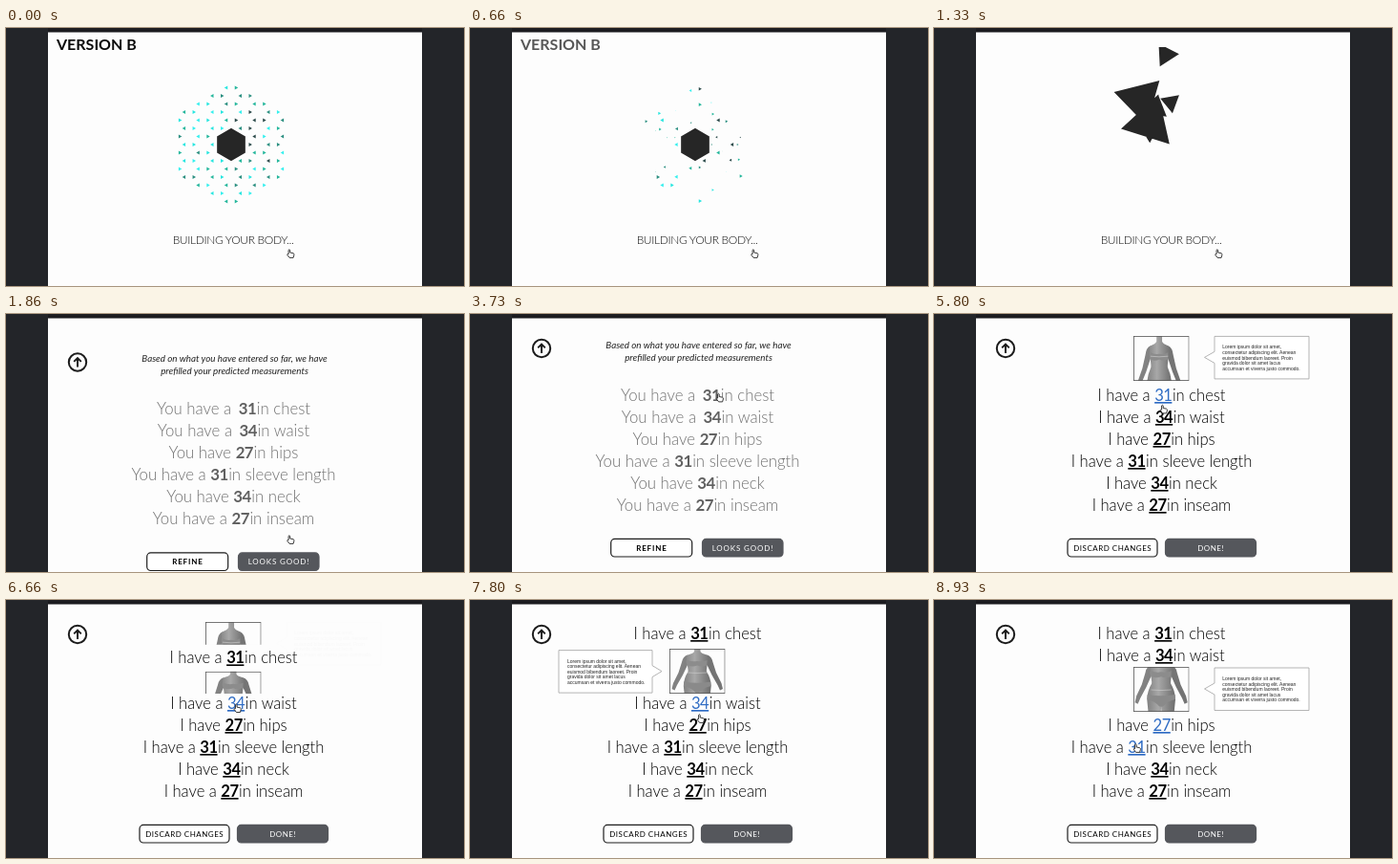
An HTML page for the animation above (9000 ms loop, 480x270 px).

```html
<!DOCTYPE html>
<html lang="en">
<head>
<meta charset="utf-8">
<title>Measurements</title>
<style>
  html, body { margin: 0; width: 100%; height: 100%; overflow: hidden; background: #232529; }
  svg { display: block; }
  #stage { width: 100vw; height: 100vh; }
  text { font-family: Lato, "Open Sans", sans-serif; white-space: pre; }
  .mid { text-anchor: middle; }
  .num { letter-spacing: -.5px; }
  .view { font-size: 16.8px; font-weight: 300; fill: #707070; }
  .view .num { font-weight: 700; fill: #606060; }
  .edit { font-size: 16.6px; font-weight: 300; fill: #000; }
  .edit .num { font-weight: 700; fill: #000; text-decoration: underline; }
  .edit .num.on { font-weight: 400; fill: #2f6cc4; }
  .btn { font-size: 8px; letter-spacing: .5px; }
  #viewPage .btn { letter-spacing: .85px; }
  .intro { font-size: 9.8px; font-style: italic; fill: #222; }
  .note text { font: 5px "Liberation Sans", Arial, sans-serif; fill: #222; }
  .note path { fill: #fff; stroke: #a2a2a2; stroke-width: .8; }
</style>
</head>
<body>
<svg id="stage" viewBox="0 0 480 270"></svg>
<script>
const LOOP = 9000;
const stage = document.getElementById('stage');
const $ = id => document.getElementById(id);

const clamp = v => Math.max(0, Math.min(1, v));
const span = (t, a, b) => clamp((t - a) / (b - a));
const smooth = p => p * p * (3 - 2 * p);
const easeOut = p => 1 - (1 - p) ** 2;
const mix = (a, b, p) => a + (b - a) * p;
const rand = n => { const v = Math.sin(n * 127.1 + 3.7) * 43758.5453; return v - Math.floor(v); };

// Loader: a hexagon cut into equilateral triangles
const SIDE = 17, COL = SIDE * Math.sqrt(3) / 2, CX = 236, CY = 122;
const TINTS = ['#27e6e0', '#35f0ee', '#25b79c', '#2b8f80', '#2b4a4a'];

function triangle(x, y, side, deg) {
  const r = side / Math.sqrt(3);
  return 'M' + [0, 120, 240].map(k => {
    const a = (deg + k) * Math.PI / 180;
    return (x + r * Math.cos(a)).toFixed(2) + ' ' + (y + r * Math.sin(a)).toFixed(2);
  }).join('L') + 'Z';
}

const bits = [];
for (let c = -4; c < 4; c++) {
  for (let m = -8; m <= 8; m++) {
    const right = (m + c) % 2 !== 0;
    const x = (c + (right ? 1 : 2) / 3) * COL, y = m * SIDE / 2;
    if (Math.abs(y) + Math.abs(x) / Math.sqrt(3) > 4 * SIDE || Math.hypot(x, y) < 11) continue;
    bits.push({ x, y, deg: right ? 0 : 180, seed: bits.length + 1 });
  }
}

// x, y, side and heading of each large shard, with its sector in the hexagon
const shards = [
  [243, 28.5, 24, 0, 5], [216, 75, 49, 78, 4], [226, 99, 53, -70, 3],
  [248, 78, 20, 81, 0], [226, 110, 18, 90, 2], [234, 85, 22, 40, 1]
];

// Measurement pages
const rows = [
  ['have a ', 31, 'chest'], ['have a ', 34, 'waist'], ['have ', 27, 'hips'],
  ['have a ', 31, 'sleeve length'], ['have ', 34, 'neck'], ['have a ', 27, 'inseam']
];
const rowY = i => 91 + 23 * i;

const list = (who, kind, gap) => rows.map(([verb, n, part], i) =>
  `<text id="${kind}${i}" class="mid ${kind}" x="238.5" y="${rowY(i)}">${who} ${verb}` +
  `<tspan class="num" dx="${i < 2 ? gap : 0}">${n}</tspan><tspan dx=".5">in ${part}</tspan></text>`).join('');

const button = (x, w, label, solid, weight = 400) =>
  `<rect x="${x}" y="235.4" width="${w}" height="18.6" rx="4" fill="${solid ? '#55575c' : '#fff'}"
    stroke="${solid ? '#55575c' : '#1c1c1c'}" stroke-width="1.2"/>
  <text class="mid btn" x="${x + w / 2 + .2}" y="247.8" font-weight="${weight}"
    fill="${solid ? '#fff' : '#000'}">${label}</text>`;

const upArrow = `<g fill="none" stroke="#1c1c1c" stroke-width="2">
  <circle cx="75" cy="36" r="9.2"/><path d="M75 41V32M71.2 35.4L75 31.6L78.8 35.4"/></g>`;

const lorem = ['Lorem ipsum dolor sit amet,', 'consectetur adipiscing elit. Aenean',
  'euismod bibendum laoreet. Proin', 'gravida dolor sit amet lacus',
  'accumsan et viverra justo commodo.'];

function note(id, y, left) {
  const x = left ? 93 : 294;
  const shape = left
    ? 'M0 0H98V16L108 22L98 28V44.5H0Z'
    : 'M0 0H99V44.5H0V28L-10.5 22L0 16Z';
  return `<g id="${id}" class="note" transform="translate(${x} ${y})"><path d="${shape}"/>` +
    lorem.map((s, i) => `<text x="${left ? 9 : 8.3}" y="${13 + 5.6 * i}">${s}</text>`).join('') + '</g>';
}

const arm = 'M19 6.5Q14 8 13 14L9.5 25L4 36L2.5 42L5.5 43.5L8 38L14 27.5L19 17Z';

const figure = (id, y, pose, tape) => `<svg id="${id}" x="209" y="${y}" width="58.5" height="47">
  <rect width="58.5" height="47" fill="#fdfdfd"/>
  <g id="${id}Body" transform="${pose}">
    <path d="${arm}" fill="#828282"/>
    <path d="${arm}" fill="#747474" transform="matrix(-1 0 0 1 58.5 0)"/>
    <path d="M26 -8V3Q25 5 18.5 6.7L17.5 14Q20 19 19.5 24Q15 31 14.8 39L17 60H28.5L29.2 46L30 60H41.5L43.7 39
      Q43.5 31 39 24Q38.5 19 41 14L40 6.7Q33.5 5 32.5 3V-8Z" fill="url(#skin)"/>
    <path d="M19 12Q24 14 29.2 13Q34.5 14 39.5 12L39 17.5Q34 19.5 29.2 17.5Q24 19.5 19.5 17.5Z" fill="#8c8c8c"/>
    <path d="M15.3 34.5Q29 37 43.2 34.5L43.5 39Q35 41 31 46H27.5Q23.5 41 15 39Z" fill="#8a8a8a"/>
    <path d="M19 ${tape}Q29 ${tape + 1} 39.5 ${tape}" fill="none" stroke="#d8d8d8" stroke-width=".5"/>
  </g>
  <rect x=".4" y=".4" width="57.7" height="46.2" fill="none" stroke="#555" stroke-width=".8"/></svg>`;

stage.innerHTML = `
  <defs>
    <linearGradient id="skin">
      <stop offset="0" stop-color="#808080"/><stop offset=".4" stop-color="#a8a8a8"/>
      <stop offset="1" stop-color="#6c6c6c"/>
    </linearGradient>
    <clipPath id="loaderBox"><rect x="134" y="20" width="204" height="204"/></clipPath>
    <clipPath id="sheet"><rect x="44" y="4.5" width="392" height="266"/></clipPath>
  </defs>
  <rect width="480" height="270" fill="#232529"/>
  <rect x="44" width="392" height="5" fill="#1c1c20"/>
  <rect x="44" y="4.5" width="392" height="266" fill="#fdfdfd"/>
  <g clip-path="url(#sheet)">
    <text id="title" x="53" y="22.6" font-size="16" font-weight="700" fill="#0a0a0a">VERSION B</text>
    <g id="loader">
      <g clip-path="url(#loaderBox)">
        ${bits.map((b, i) => `<path id="bit${i}"/>`).join('')}
        <path id="shards" fill="#262626"/>
      </g>
      <text class="mid" x="238" y="225.6" font-size="12" font-weight="300" letter-spacing="-.36"
        fill="#111">BUILDING YOUR BODY...</text>
    </g>
    <g id="viewPage">
      ${upArrow}
      <text class="mid intro" x="239.5" y="35.8">Based on what you have entered so far, we have</text>
      <text class="mid intro" x="239.5" y="49">prefilled your predicted measurements</text>
      ${list('You', 'view', 3)}
      ${button(147.7, 85, 'REFINE', false, 700)}
      ${button(243.5, 84.5, 'LOOKS GOOD!', true)}
    </g>
    <g id="editPage">
      ${upArrow}
      ${figure('fig0', 23, '', 15)}
      ${figure('fig1', 51, '', 25)}
      ${figure('fig2', 70, 'translate(-1 -9) scale(1.03 1.1)', 30)}
      ${list('I', 'edit', 0)}
      ${note('note0', 23.4, false)}
      ${note('note1', 52.6, true)}
      ${note('note2', 71, false)}
      ${button(140, 94, 'DISCARD CHANGES', false)}
      ${button(242.5, 95, 'DONE!', true)}
    </g>
  </g>
  <path id="hand" d="M-2.4 .6V-3.6Q-1.6 -4.8 -.8 -3.6V-1L2.6 -.3Q3.6 .1 3.4 1.4L2.6 4.4H-1.4L-3.8 1.2Q-3.6 0 -2.4 .6Z"
    fill="#fff" stroke="#222" stroke-width=".9" stroke-linejoin="round"/>`;

// Pointer stops: time, x, y
const stops = [
  [0, 298.5, 236], [2600, 298.5, 236], [2730, 298, 230], [3000, 298, 230], [3730, 262, 87.5],
  [3930, 262, 87], [5000, 262, 87], [5800, 241, 99.5], [6060, 242, 117], [6330, 242, 117],
  [7060, 244, 108], [7350, 244, 108], [7600, 243, 111], [7800, 242, 124], [8000, 235, 133],
  [8260, 235, 133], [8930, 213, 155], [LOOP, 213, 155]
];

function pointer(t) {
  const i = stops.findIndex(s => s[0] > t);
  const [t0, x0, y0] = stops[i - 1], [t1, x1, y1] = stops[i];
  const p = smooth(span(t, t0, t1));
  return `translate(${mix(x0, x1, p)} ${mix(y0, y1, p)})`;
}

function show(id, alpha, dy) {
  const el = $(id);
  el.style.display = alpha > 0 ? '' : 'none';
  el.setAttribute('opacity', alpha);
  if (dy !== undefined) el.setAttribute('transform', `translate(0 ${dy})`);
}

function unfold(id, top, open, fromBottom) {
  const el = $(id), h = 47 * open;
  el.style.display = h > .5 ? '' : 'none';
  el.setAttribute('y', fromBottom ? top + 47 - h : top);
  el.setAttribute('height', h);
}

function drawLoader(t) {
  show('loader', 1 - span(t, 1420, 1600));
  if (t > 1600) return;
  bits.forEach((b, i) => {
    const delay = 120 + 580 * rand(b.seed);
    const p = smooth(span(t, delay, delay + 260));
    const bright = b.x < 0 || b.y > 30 ? 0 : 1.6;
    const wave = rand(b.seed * 3 + Math.floor((t + 40 * (i % 5)) / 200) * 17);
    const el = $('bit' + i);
    el.setAttribute('d', triangle(CX + b.x * (1 - .2 * p), CY + b.y * (1 - .2 * p), 4 * (1 - p), b.deg));
    el.setAttribute('fill', TINTS[Math.min(4, Math.floor(wave * 3.6 + bright))]);
  });
  const k = Math.max(0, (t - 1000) / 330), p = k * k;
  $('shards').setAttribute('d', shards.map(([x, y, side, deg, sector]) => {
    const a = sector * Math.PI / 3, r = SIDE / Math.sqrt(3);
    return triangle(mix(CX + r * Math.cos(a), x, p), mix(CY + r * Math.sin(a), y, p),
      mix(SIDE + .4, side, p), mix(180 + sector * 60, deg, p));
  }).join(''));
}

function draw(t) {
  show('title', 1 - span(t, 500, 1000));
  drawLoader(t);

  const rise = 270 * (1 - span(t, 1400, 2000)) ** 2;
  const leave = smooth(span(t, 4000, 4400));
  show('viewPage', t < 1400 ? 0 : 1 - leave, rise + 12 * leave);

  const enter = easeOut(span(t, 4350, 5050));
  show('editPage', enter, 12 * (1 - enter));

  const second = smooth(span(t, 6270, 7060));
  const third = smooth(span(t, 8200, 8930));
  $('edit0').setAttribute('y', rowY(0) - 50 * second);
  $('edit1').setAttribute('y', rowY(1) - 50 * third);
  unfold('fig0', 23, 1 - second, false);
  unfold('fig1', 51, second * (1 - third), third === 0);
  unfold('fig2', 70, third, true);
  const turn = smooth(span(t, 4700, 5800));
  $('fig0Body').setAttribute('transform',
    `translate(${mix(0, .8, turn)} 2) scale(${mix(1, .9, turn)} 1.28)`);

  show('note0', 1 - span(second, 0, .5));
  show('note1', span(second, .5, 1) * (1 - span(third, 0, .5)));
  show('note2', span(third, .5, 1));

  const active = t < 6330 ? 0 : t < 8260 ? 1 : 2;
  rows.forEach((r, i) => {
    const on = i === active || (i === 3 && t > 8780);
    $('edit' + i).querySelector('.num').classList.toggle('on', on);
  });
  $('hand').setAttribute('transform', pointer(t));
}

const start = performance.now();
function tick() {
  draw((performance.now() - start) % LOOP);
  requestAnimationFrame(tick);
}
tick();
</script>
</body>
</html>
```
